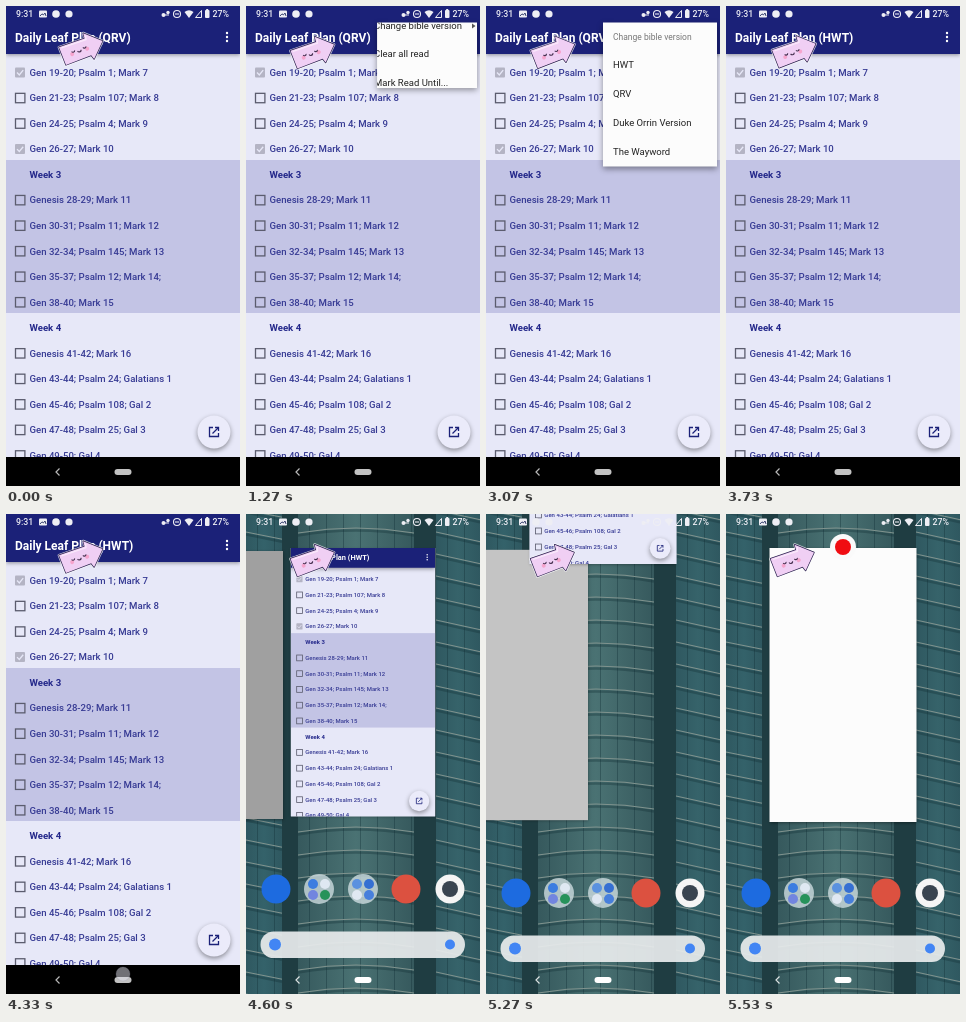
An HTML page with a canvas for the animation above (5.59 s loop, 234x480 px).

```html
<!DOCTYPE html>
<html lang="en">
<head>
<meta charset="utf-8">
<title>Reading plan</title>
<style>
html, body { margin: 0; height: 100%; overflow: hidden; background: #000; }
canvas { display: block; width: 234px; height: 480px; }
</style>
</head>
<body>
<canvas id="stage"></canvas>
<script>
const W = 234, H = 480, LOOP = 5590, FPS = 15;
const canvas = document.getElementById('stage');
const c = canvas.getContext('2d');
const ratio = window.devicePixelRatio || 1;
canvas.width = W * ratio;
canvas.height = H * ratio;

const NAVY = '#1b2178', INK = '#373b94', PALE = '#e7e8f8', WEEK = '#c3c4e5';
const ROW_TOP = 67, ROW_STEP = 25.53;
const ROWS = [
  'Gen 19-20; Psalm 1; Mark 7', 'Gen 21-23; Psalm 107; Mark 8',
  'Gen 24-25; Psalm 4; Mark 9', 'Gen 26-27; Mark 10', 'Week 3',
  'Genesis 28-29; Mark 11', 'Gen 30-31; Psalm 11; Mark 12',
  'Gen 32-34; Psalm 145; Mark 13', 'Gen 35-37; Psalm 12; Mark 14;',
  'Gen 38-40; Mark 15', 'Week 4', 'Genesis 41-42; Mark 16',
  'Gen 43-44; Psalm 24; Galatians 1', 'Gen 45-46; Psalm 108; Gal 2',
  'Gen 47-48; Psalm 25; Gal 3', 'Gen 49-50; Gal 4'
];
const MENU = ['Change bible version', 'Clear all read', 'Mark Read Until...'];
const VERSIONS = ['Change bible version', 'HWT', 'QRV', 'Duke Orrin Version', 'The Wayword'];

// Linear interpolation through [time, value] pairs, held at both ends.
function track(t, ...keys) {
  if (t <= keys[0][0]) return keys[0][1];
  for (let i = 1; i < keys.length; i++) {
    const [t0, v0] = keys[i - 1], [t1, v1] = keys[i];
    if (t < t1) return v0 + (v1 - v0) * (t - t0) / (t1 - t0);
  }
  return keys[keys.length - 1][1];
}

function rect(x, y, w, h, fill) {
  c.fillStyle = fill;
  c.fillRect(x, y, w, h);
}

function pill(x, y, w, h, r, fill) {
  c.beginPath();
  c.roundRect(x, y, w, h, r);
  c.fillStyle = fill;
  c.fill();
}

function disc(x, y, r, fill) {
  c.beginPath();
  c.arc(x, y, r, 0, 7);
  c.fillStyle = fill;
  c.fill();
}

function line(points, color, width, closed) {
  c.beginPath();
  points.forEach(([x, y]) => c.lineTo(x, y));
  if (closed) c.closePath();
  c.strokeStyle = color;
  c.lineWidth = width;
  c.stroke();
}

function text(s, x, y, size, color, weight = 400) {
  c.font = `${weight} ${size}px Roboto, sans-serif`;
  c.fillStyle = color;
  c.fillText(s, x, y);
}

function shadow(blur, dy, draw) {
  c.save();
  c.shadowColor = 'rgba(0,0,0,.4)';
  c.shadowBlur = blur * ratio;
  c.shadowOffsetY = dy * ratio;
  draw();
  c.restore();
}

function checkbox(y, checked) {
  if (checked) {
    pill(9, y - 5, 10, 10, 1, '#b4b4c4');
    line([[11, y], [13.3, y + 2.4], [17.2, y - 2.3]], PALE, 1.3);
  } else {
    c.strokeStyle = '#5b5c6e';
    c.lineWidth = 1.3;
    c.strokeRect(9.5, y - 4.7, 9.4, 9.4);
  }
}

function drawApp(version) {
  c.save();
  c.beginPath();
  c.rect(0, 16, W, 435);
  c.clip();
  rect(0, 16, W, 435, PALE);
  rect(0, 154, W, 153, WEEK);
  ROWS.forEach((label, i) => {
    const y = ROW_TOP + i * ROW_STEP, heading = label.startsWith('Week');
    if (!heading) checkbox(y - .5, i === 0 || i === 3);
    text(label, 23.5, y, 9.6, heading ? '#23278a' : INK, heading ? 700 : 500);
  });
  shadow(4, 1, () => rect(0, 16, W, 32, NAVY));
  text(`Daily Leaf Plan (${version})`, 9, 32, 12, '#fff', 700);
  for (const y of [27, 31, 35]) disc(221, y, 1.2, '#fff');
  shadow(5, 2, () => disc(208, 426, 16.5, '#ebebfa'));
  line([[207, 421.5], [203.5, 421.5], [203.5, 430.5], [212.5, 430.5], [212.5, 427]], NAVY, 1.3);
  line([[206.5, 427.5], [212.5, 421.5]], NAVY, 1.3);
  line([[209, 421.5], [212.5, 421.5], [212.5, 425]], NAVY, 1.3);
  c.restore();
}

// Popup that unrolls from its top right corner.
function drawMenu(items, open, alpha, isSubmenu) {
  if (open <= 0 || alpha <= 0) return;
  const w = 114 * (.5 + .5 * open), h = (isSubmenu ? 144 : 87) * open;
  c.save();
  c.globalAlpha = alpha;
  shadow(6, 2, () => rect(231 - w, 16.5, w, h, '#fcfcfc'));
  c.beginPath();
  c.rect(231 - w, 16.5, w, h);
  c.clip();
  c.translate(0, -45 * (1 - open));
  items.forEach((label, i) => {
    const header = isSubmenu && i === 0;
    text(label, isSubmenu ? 127 : 128, 31 + i * 28.7, header ? 8.5 : 9.5, header ? '#777' : '#222');
  });
  if (!isSubmenu) {
    c.beginPath();
    c.moveTo(226, 28.5);
    c.lineTo(229.5, 31);
    c.lineTo(226, 33.5);
    c.fillStyle = '#555';
    c.fill();
  }
  c.restore();
}

// Glass front with floor lines that slope or bulge like a rounded tower.
function facade(x0, x1, edge, middle, step, slope, bulge) {
  const width = x1 - x0;
  const glass = c.createLinearGradient(x0, 0, x1, 0);
  glass.addColorStop(0, edge);
  glass.addColorStop(.5, middle);
  glass.addColorStop(1, edge);
  c.save();
  c.beginPath();
  c.rect(x0, 0, width, H);
  c.clip();
  rect(x0, 0, width, H, glass);
  for (let x = x0 + 11; x < x1; x += 17) rect(x, 0, 1, H, 'rgba(22,52,58,.4)');
  const floorLine = (y, color, thickness) => {
    c.beginPath();
    c.moveTo(x0, y);
    c.quadraticCurveTo(x0 + width / 2, y + slope * width / 2 - bulge, x1, y + slope * width);
    c.strokeStyle = color;
    c.lineWidth = thickness;
    c.stroke();
  };
  for (let y = -4; y < H + 20; y += step) {
    floorLine(y + 2.5, 'rgba(18,46,52,.35)', 2.5);
    floorLine(y, '#80938e', 1);
  }
  c.restore();
}

function drawWallpaper() {
  rect(0, 0, W, H, '#1f3d42');
  facade(0, 36, '#2f5860', '#34626a', 22, .2, 0);
  facade(52, 168, '#36595d', '#4a7273', 23, 0, 10);
  facade(190, 234, '#2f5860', '#36636a', 22, .22, 0);
}

function folder(x, y, colors) {
  disc(x, y, 15, 'rgba(205,220,224,.8)');
  colors.forEach((color, i) => disc(x + (i % 2 ? 6 : -6), y + (i < 2 ? -5 : 6), 5, color));
}

function drawTray(offset) {
  c.save();
  c.translate(0, offset);
  disc(30, 379, 14.5, '#1d6be0');
  folder(73, 379, ['#3c7de0', '#dfe8f2', '#7285df', '#26925a']);
  folder(117, 379, ['#5a91df', '#356fd2', '#e0e8f2', '#477fdc']);
  disc(160, 379, 14.5, '#dc5140');
  disc(204, 379, 14.5, '#f5f5f5');
  disc(204, 379, 8, '#394450');
  pill(14.5, 421.5, 204.5, 26.5, 13.2, 'rgba(232,235,236,.93)');
  disc(29, 434.5, 6, '#4285f4');
  disc(204, 434.5, 5, '#4285f4');
  c.restore();
}

function drawStatus() {
  const white = '#eeeef4';
  text('9:31', 10, 8, 8.8, white, 500);
  pill(33, 4.5, 8, 7, 1, white);
  line([[34, 10], [36, 7.8], [37.3, 9], [39, 7], [40, 10]], '#3a4470', 1);
  disc(50, 8, 3.8, white);
  disc(63, 8, 3.6, white);
  disc(157.5, 9, 2, white);
  disc(162, 6.5, 1.7, white);
  line([[158, 9], [163, 9]], white, 1);
  c.beginPath();
  c.arc(171, 8, 3.5, 0, 7);
  c.lineWidth = 1.1;
  c.stroke();
  line([[169, 8], [173, 8]], white, 1.1);
  c.fillStyle = white;
  c.beginPath();
  c.moveTo(183, 12);
  c.lineTo(178.5, 6);
  c.quadraticCurveTo(183, 2.5, 187.5, 6);
  c.fill();
  line([[189.5, 11.5], [195.5, 11.5], [195.5, 4.5]], white, 1, true);
  pill(199, 4, 4.5, 8, 1, white);
  rect(200.2, 3, 2, 1.5, white);
  text('27%', 206.5, 8, 8.8, white, 500);
}

function drawNav(bright) {
  line([[53.5, 462.5], [50, 466], [53.5, 469.5]], bright ? '#dde3e3' : '#b9b9b9', 1.2);
  pill(108.5, 463, 17, 6, 3, bright ? '#fff' : '#c2c2c2');
}

function touch(x, y) {
  disc(x, y, 7, 'rgba(225,225,235,.5)');
  c.lineWidth = 1;
  c.strokeStyle = 'rgba(140,140,165,.22)';
  c.stroke();
}

function drawArrow(t) {
  const left = 1 - track(t % 720, [30, 0], [270, 1]);
  const push = left ** 3;
  c.save();
  c.translate(88 + 8.5 * push, 38.5 - 3.5 * push);
  c.rotate(-20 * Math.PI / 180);
  c.lineJoin = 'round';
  const outline = [[0, 0], [-15.5, -14], [-16, -8.5], [-43, -9], [-42.5, 10], [-15.5, 9.5], [-14, 14]];
  line(outline, 'rgba(255,255,255,.75)', 2.8, true);
  line(outline, '#2c2350', 1.4, true);
  c.fillStyle = '#f0cff4';
  c.fill();
  line([[-41, -7.5], [-15, -7], [-14, -11]], '#fae9fb', 1.3);
  disc(-33, 2, 2, '#f6a4cd');
  disc(-17, 2, 2, '#f6a4cd');
  c.strokeStyle = '#463050';
  c.lineWidth = 1.1;
  for (const [x, y, r] of [[-31, -1, 1.6], [-19, -1, 1.6], [-25, .5, 1.9]]) {
    c.beginPath();
    c.arc(x, y, r, .2, Math.PI - .2);
    c.stroke();
  }
  c.restore();
}

function drawRecents(t) {
  const shrink = track(t, [4330, 0], [4400, .22], [4470, .68], [4535, .93], [4600, 1]);
  const scale = t < 4600 ? 1 - .383 * shrink : track(t, [4600, .617], [4800, .628]);
  const drag = track(t, [4800, 0], [4870, -14], [5070, -73], [5130, -100], [5200, -170], [5330, -340]);
  drawWallpaper();
  drawTray(t < 4600 ? 105 - 109 * shrink : track(t, [4600, -4], [4800, 0]));

  // The neighbouring card slides to the centre, growing and brightening.
  const right = track(t, [4370, -40], [4600, 37], [4800, 37], [5070, 45], [5200, 62], [5330, 140], [5400, 175], [5470, 190.5]);
  const shade = Math.round(track(right, [45, 160], [190, 252]));
  const top = track(right, [45, 37], [190, 34]);
  shadow(3, 1, () => rect(right - 147, top, 147, 342 - 2 * top, `rgb(${shade},${shade},${shade})`));

  c.save();
  c.translate(W / 2 * (1 - scale), 16 + 18 * shrink + drag);
  c.scale(scale, scale);
  c.translate(0, -16);
  shadow(3, 1, () => rect(0, 16, W, 435, PALE));
  drawApp('HWT');
  c.restore();

  const badge = track(t, [5330, 0], [5500, 1]);
  if (badge) {
    disc(right - 73.5, 33, 13 * badge, '#fafafa');
    disc(right - 73.5, 33, 8 * badge, '#f00d12');
  }
  // System bars of the open app fade away as it shrinks.
  c.globalAlpha = Math.max(0, 1 - shrink * 2);
  rect(0, 0, W, 16, NAVY);
  rect(0, 451, W, 29, '#000');
  c.globalAlpha = 1;
  drawNav(shrink > .4);
  if (t < 4560) touch(117, track(t, [4330, 460], [4400, 420], [4530, 270]));
  if (t > 4760 && t < 5150) touch(113, 243 + drag);
}

function drawReader(t) {
  rect(0, 0, W, 16, NAVY);
  rect(0, 451, W, 29, '#000');
  drawApp(t < 3520 ? 'QRV' : 'HWT');
  drawNav(false);
  drawMenu(MENU, track(t, [1130, 0], [1200, .4], [1267, .755], [1333, .95], [1400, 1]),
    track(t, [2200, 1], [2330, 0]), false);
  drawMenu(VERSIONS, track(t, [2200, 0], [2267, .4], [2333, .8], [2400, 1]),
    track(t, [3470, 1], [3600, 0]), true);
  const taps = [[1000, 1190, 221, 31], [2000, 2190, 165, 32], [3300, 3460, 140, 60], [4260, 4400, 117, 460]];
  for (const [from, to, x, y] of taps) if (t > from && t < to) touch(x, y);
}

function frame() {
  const time = performance.now() % LOOP;
  const t = Math.floor(time * FPS / 1000 + .06) * 1000 / FPS;
  c.setTransform(ratio, 0, 0, ratio, 0, 0);
  c.textBaseline = 'middle';
  if (t < 4340) drawReader(t);
  else drawRecents(t);
  drawStatus();
  drawArrow(t);
  requestAnimationFrame(frame);
}
frame();
</script>
</body>
</html>
```
